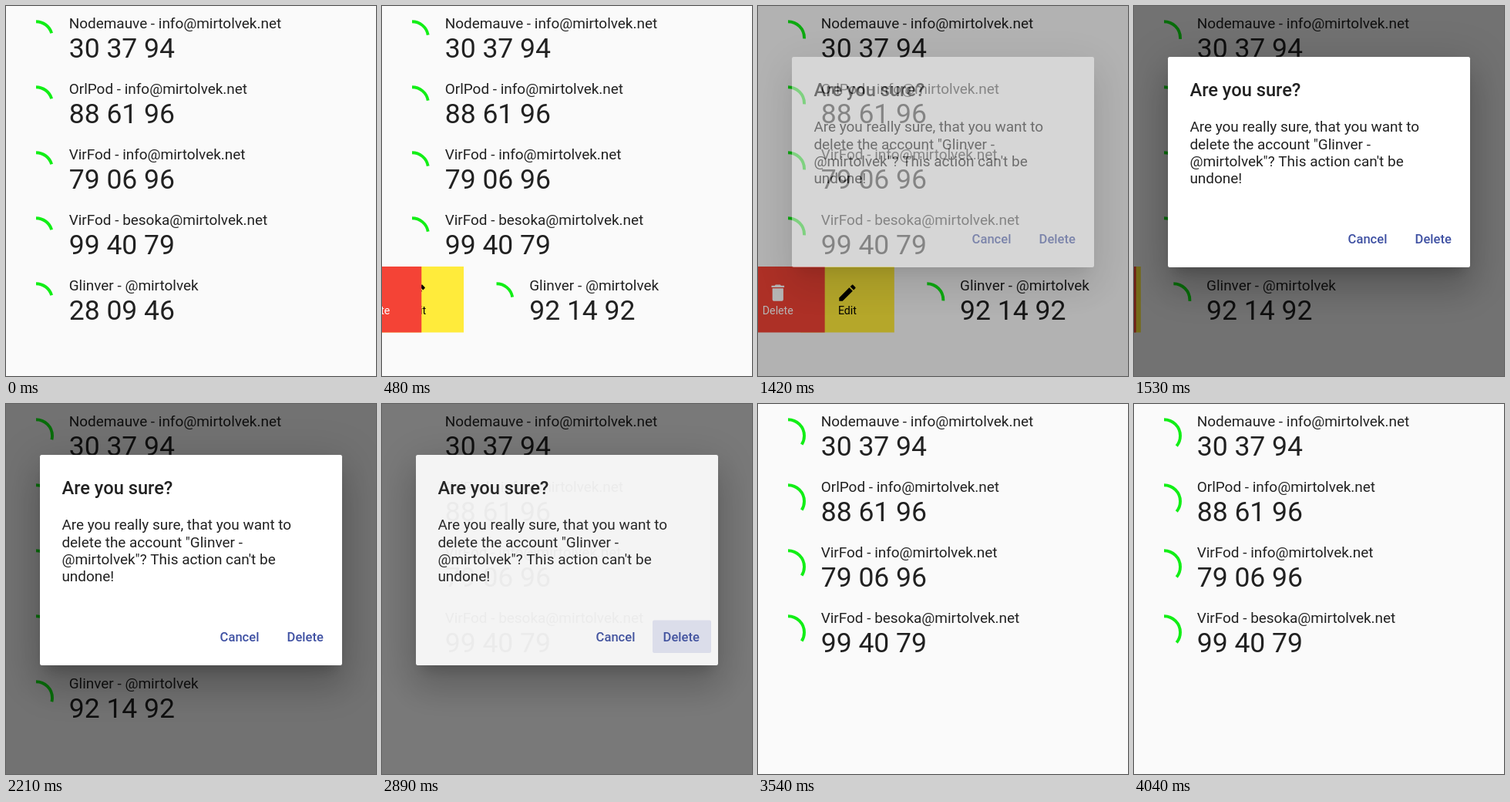
An HTML page with a canvas that plays this animation: 480x480 px, repeating every 4.09 s.

```html
<!DOCTYPE html>
<html lang="en">
<head>
<meta charset="utf-8">
<title>One-time codes</title>
<style>
  html, body { margin: 0; width: 100%; height: 100%; overflow: hidden; background: #fafafa; }
  canvas { position: absolute; left: 0; top: 0; }
</style>
</head>
<body>
<canvas id="list" width="480" height="480"></canvas>
<canvas id="dialog" width="480" height="480"></canvas>
<script>
const LOOP = 4090;
const DP = 1.1838;            // pixels per layout unit
const EDGE = -3.5;            // left edge of the screen
const ROW_H = 85;
const ROW_TOP = -2;
const OPEN = 243.5;           // full width of the slide actions
const HALF_OPEN = 109.5;
const FONT = 'Roboto, "Noto Sans", sans-serif';
const INK = 'rgba(0,0,0,.87)';
const INDIGO = '#3f51a3';

const rows = [
  ['Nodemauve - info@mirtolvek.net', '30 37 94'],
  ['OrlPod - info@mirtolvek.net', '88 61 96'],
  ['VirFod - info@mirtolvek.net', '79 06 96'],
  ['VirFod - besoka@mirtolvek.net', '99 40 79'],
  ['Glinver - @mirtolvek', '28 09 46']
];
const NEW_CODE = '92 14 92';

const message = [
  'Are you really sure, that you want to',
  'delete the account "Glinver -',
  '@mirtolvek"? This action can\'t be',
  'undone!'
];

const trash = new Path2D('M6 19c0 1.1.9 2 2 2h8c1.1 0 2-.9 2-2V7H6zM19 4h-3.5l-1-1h-5l-1 1H5v2h14z');
const pencil = new Path2D('M3 17.25V21h3.75L17.81 9.94l-3.75-3.75zM20.71 7.04c.39-.39.39-1.02 0-1.41' +
  'l-2.34-2.34c-.39-.39-1.02-.39-1.41 0l-1.83 1.83 3.75 3.75z');

// Stretches of time in which the picture stands still.
const holds = [[0, 100], [480, 740], [740, 920], [970, 1130], [1530, 1620]];

const dialogCanvas = document.getElementById('dialog');
const list = document.getElementById('list').getContext('2d');
const dialog = dialogCanvas.getContext('2d');

const clamp = v => Math.min(1, Math.max(0, v));
const progress = (t, start, length) => clamp((t - start) / length);
const easeOut = (v, power = 2) => 1 - Math.pow(1 - v, power);
const easeInOut = v => (1 - Math.cos(Math.PI * v)) / 2;

function settle(t) {
  const hold = holds.find(([from, to]) => t >= from && t < to);
  return hold ? hold[0] : t;
}

function text(g, str, x, y, size, color = INK, weight = 400, align = 'left') {
  g.font = `${weight} ${size}px ${FONT}`;
  g.fillStyle = color;
  g.textAlign = align;
  g.fillText(str, x, y);
}

function slideOffset(t) {
  if (t < 480) return HALF_OPEN * easeInOut(progress(t, 50, 430));
  if (t < 740) return HALF_OPEN;
  return OPEN * (1 - progress(t, 1380, 158));
}

// 0 while the dialog is closed, 1 while it is fully open.
function dialogPhase(t) {
  return t < 2000 ? progress(t, 1380, 150) : 1 - progress(t, 2854, 130);
}

function drawAction(right, top, fill, ink, icon, label) {
  const width = OPEN / 2, mid = right - width / 2;
  list.fillStyle = fill;
  list.fillRect(right - width, top, width, ROW_H + 0.5);
  list.save();
  list.translate(mid - 12 * DP, top + 20);
  list.scale(DP, DP);
  list.fillStyle = ink;
  list.fill(icon);
  list.restore();
  text(list, label, mid, top + 62, 12 * DP, ink, 400, 'center');
}

function drawRow(name, code, top, dx, sweep) {
  if (sweep) {
    const start = -Math.PI / 2;
    list.strokeStyle = '#12ee16';
    list.lineWidth = 3.9;
    list.beginPath();
    list.arc(39 + dx, top + 43.2, 21, start, start + sweep * Math.PI / 180);
    list.stroke();
  }
  text(list, name, 81.7 + dx, top + 31, 16 * DP);
  text(list, code, 81.7 + dx, top + 69, 30 * DP);
}

function drawList(t) {
  list.fillStyle = '#fafafa';
  list.fillRect(0, 0, 480, 480);
  const removed = t >= 2880;
  const sweep = removed && t < 2945 ? 0 : 73.5 + 0.0138 * t;
  rows.forEach(([name, code], i) => {
    const top = ROW_TOP + i * ROW_H;
    const last = i === rows.length - 1;
    if (last && removed) return;
    const dx = last ? slideOffset(t) : 0;
    if (dx > 0) {
      drawAction(EDGE + dx, top, '#ffeb3b', '#000', pencil, 'Edit');
      drawAction(EDGE + dx / 2, top, '#f44336', '#fff', trash, 'Delete');
    }
    drawRow(name, last && t >= 100 ? NEW_CODE : code, top, dx, sweep);
  });
  list.fillStyle = `rgba(0,0,0,${0.54 * easeOut(dialogPhase(t), 2.4)})`;
  list.fillRect(0, 0, 480, 480);
}

function box(x, y, w, h, fill) {
  dialog.fillStyle = fill;
  dialog.beginPath();
  dialog.roundRect(x, y, w, h, 2 * DP);
  dialog.fill();
}

function dropShadow(dy, blur, spread, alpha) {
  const away = 2000;
  const s = spread * DP;
  dialog.save();
  dialog.shadowColor = `rgba(0,0,0,${alpha})`;
  dialog.shadowBlur = blur * DP;
  dialog.shadowOffsetX = away;
  dialog.shadowOffsetY = dy * DP;
  box(44 - s - away, 66 - s, 392 + 2 * s, 273 + 2 * s, '#000');
  dialog.restore();
}

function drawDialog(t) {
  const opacity = easeOut(dialogPhase(t));
  dialogCanvas.style.opacity = opacity;
  dialog.clearRect(0, 0, 480, 480);
  if (!opacity) return;
  dropShadow(11, 15, -7, 0.2);
  dropShadow(24, 38, 3, 0.14);
  dropShadow(9, 46, 8, 0.12);
  box(44, 66, 392, 273, '#fff');
  text(dialog, 'Are you sure?', 72.4, 117, 20 * DP, INK, 500);
  message.forEach((line, i) => text(dialog, line, 72.4, 163.3 + i * 22.3, 16 * DP));
  const press = progress(t, 2730, 110);
  if (press) box(351, 280.5, 76, 42.5, `rgba(63,81,181,${0.14 * press})`);
  text(dialog, 'Cancel', 277.6, 307.7, 14 * DP, INDIGO, 500);
  text(dialog, 'Delete', 364.6, 307.7, 14 * DP, INDIGO, 500);
}

function frame() {
  const t = settle(performance.now() % LOOP);
  drawList(t);
  drawDialog(t);
  requestAnimationFrame(frame);
}
frame();
</script>
</body>
</html>
```
